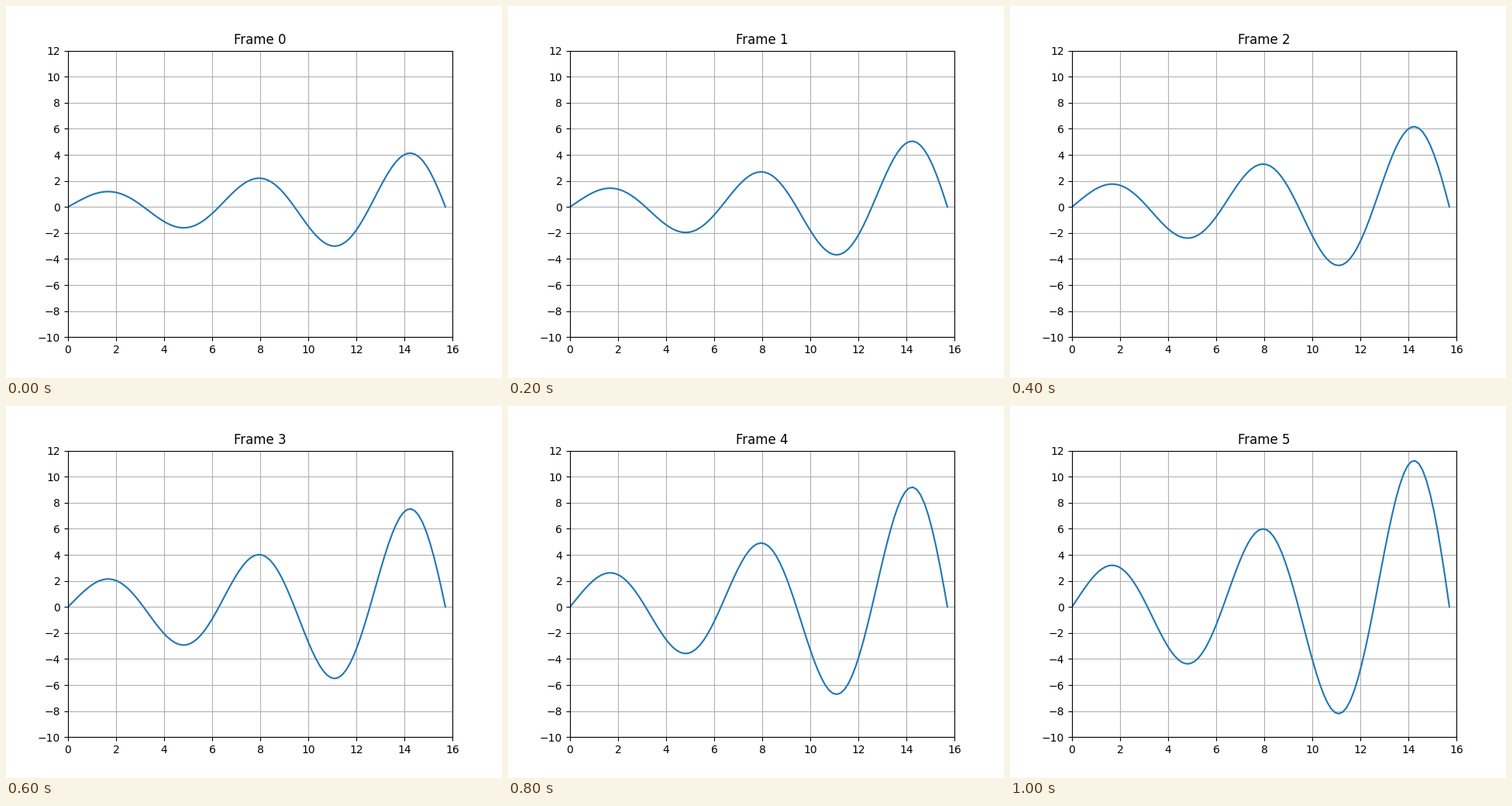
Write a matplotlib script that moves like this. It is 640 px wide and 480 px high and loops after 1.2 s.

```python
import numpy as np
import matplotlib.pyplot as plt
from matplotlib.animation import FuncAnimation

FRAMES = 6
INTERVAL = 200

fig, ax = plt.subplots(figsize=(6.4, 4.8), dpi=100)
ax.set(xlim=(0, 16), ylim=(-10, 12))
ax.set_xticks(range(0, 17, 2))
ax.set_yticks(range(-10, 13, 2))
ax.grid(True)

x = np.linspace(0, 5 * np.pi, 100)
line, = ax.plot([], [])
title = ax.set_title("")


def update(n):
    # The whole wave grows exponentially, along x and with each step.
    line.set_data(x, np.sin(x) * np.exp(0.1 * x + 0.2 * n))
    title.set_text(f"Frame {n}")
    return line, title


anim = FuncAnimation(fig, update, frames=FRAMES, interval=INTERVAL,
                     repeat=True, repeat_delay=0, blit=False)
plt.show()
```
